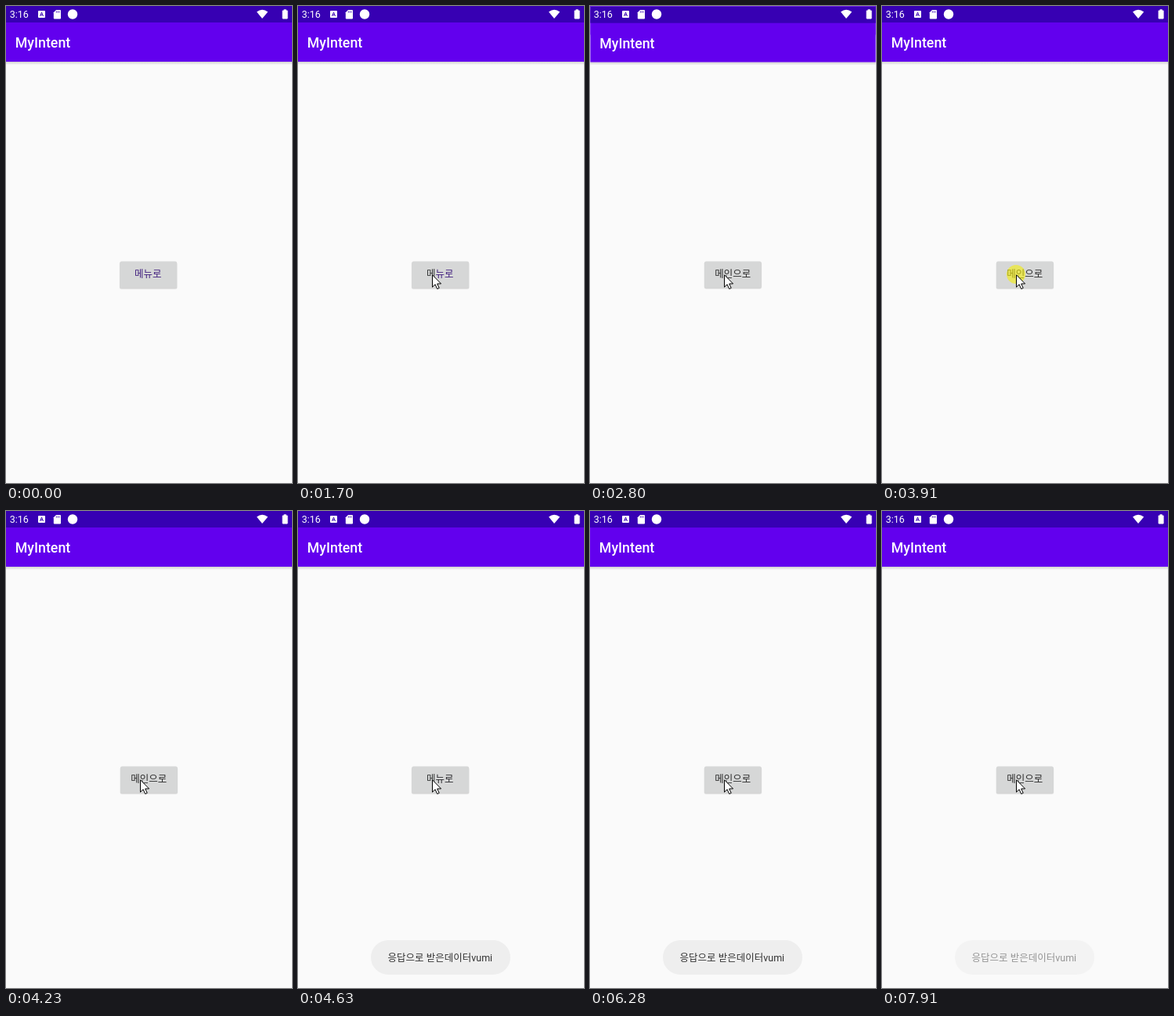
Recreate the animation shown at these times as an HTML page. Size 365x608 px, loop 7990 ms.

```html
<!DOCTYPE html>
<html lang="ko">
<head>
<meta charset="utf-8">
<title>MyIntent</title>
<style>
  html, body { margin: 0; width: 100%; height: 100%; overflow: hidden; background: #fafafa; }
  svg { display: block; width: 100%; height: 100%; }
  text { font-family: Roboto, "Noto Sans CJK KR", "Noto Sans CJK", sans-serif; font-size: 12.5px; white-space: pre; }
  .title { font-size: 17.8px; font-weight: 500; fill: #fff; }
</style>
</head>
<body>
<svg viewBox="0 0 365 608">
  <defs>
    <linearGradient id="shade" x2="0" y2="1">
      <stop offset="0" stop-color="#000" stop-opacity=".17"/>
      <stop offset="1" stop-color="#000" stop-opacity="0"/>
    </linearGradient>
    <g id="frame">
      <rect width="365" height="608" fill="#fafafa"/>
      <rect y="71" width="365" height="4" fill="url(#shade)"/>
      <rect width="365" height="71" fill="#6200ee"/>
      <rect width="365" height="21" fill="#3700b3"/>
      <text class="title" x="11.8" y="53.3">MyIntent</text>
    </g>
    <g id="lift" fill="#000">
      <rect x="-.7" y=".6" width="74" height="35" rx="2.5" opacity=".05"/>
      <rect x="-.3" y=".6" width="73.2" height="34.2" rx="2.2" opacity=".1"/>
    </g>
  </defs>

  <g id="main">
    <use href="#frame"/>
    <use href="#lift" x="145.4" y="325.6"/>
    <rect id="mainBtn" x="145.4" y="325.6" width="72.6" height="33.4" rx="1.8"/>
    <text x="164" y="346.4"><tspan id="head">메</tspan><tspan id="tail">뉴로</tspan></text>
  </g>

  <g id="menu">
    <use href="#frame"/>
    <use href="#lift" x="146.1" y="325.6"/>
    <rect id="menuBtn" x="146.1" y="325.6" width="72.6" height="33.4" rx="1.8"/>
    <text x="159.3" y="346.4" fill="#2b2b2b">메인으로</text>
  </g>

  <g id="status" fill="#fff">
    <text x="4.7" y="15.3">3:16</text>
    <rect x="41" y="6" width="9" height="9" rx="1"/>
    <path d="M43.5 12.9 45.5 8l2 4.9M44.2 11.4h2.6" fill="none" stroke="#3700b3" stroke-width="1"/>
    <path d="M64 5h5a1 1 0 0 1 1 1v9.4a1 1 0 0 1-1 1h-7.2a1 1 0 0 1-1-1V8.2z"/>
    <path d="M64.3 6.4v2.2M66.2 6.4v2.2M68.1 6.4v2.2" stroke="#3700b3" stroke-width=".8"/>
    <circle cx="85" cy="10.5" r="6.2"/>
    <path d="M327 16 320 7.4Q327 2.200 334.200 7.4z"/>
    <path d="M354.600 5.400V4.200h3V5.400h1.200a.8.8 0 0 1 .8.8v9.400a.8.8 0 0 1-.8.8h-5.400a.8.8 0 0 1-.8-.8V6.200a.8.8 0 0 1 .8-.8z"/>
  </g>

  <g id="toast">
    <rect x="93" y="547" width="178" height="44" rx="22" fill="#eee"/>
    <text x="114.600" y="573.800" fill="#333">응답으로 받은데이터vumi</text>
  </g>

  <circle id="tap" cx="171" cy="342" r="12" fill="#f4ee10" opacity=".62"/>
  <path id="arrow" d="M.5.800V16.300L4.100 12.900 6.700 18.600 9.200 17.500 6.700 12H11.600z" fill="#fff" stroke="#000" stroke-width="1"/>
</svg>

<script>
const LOOP = 7990;
const $ = id => document.getElementById(id);
const [main, menu, mainBtn, menuBtn, head, tail, toast, tap, arrow] =
  ["main", "menu", "mainBtn", "menuBtn", "head", "tail", "toast", "tap", "arrow"].map($);

const runs = [
  [0, 1, 0], [830, 11, 79], [1700, 1, 0], [2010, 2, 100], [2320, 1, 0], [2480, 6, 80],
  [3910, 3, 80], [4230, 6, 80], [5640, 3, 80], [5960, 5, 80], [7750, 3, 80]
];
const ticks = runs.flatMap(([at, n, gap]) => Array.from({ length: n }, (_, i) => at + i * gap));

const clamp = v => Math.max(0, Math.min(1, v));
const ramp = (t, a, b) => clamp((t - a) / (b - a));
const mix = (a, b, k) => a + (b - a) * k;
const within = (t, a, b) => t >= a && t < b;
const show = (el, on) => el.setAttribute("display", on ? "inline" : "none");
const bez = (u, a, b, c, d) => {
  const v = 1 - u;
  return v * v * v * a + 3 * v * v * u * b + 3 * v * u * u * c + u * u * u * d;
};

// Two joined curves: quick start, very long settle.
function settle(x) {
  if (x <= 0 || x >= 1) return clamp(x);
  const k = 1 / 6;
  const [px, py] = x < k
    ? [[0, .05, .13333, k], [0, 0, .06, .4]]
    : [[k, .20833, .25, 1], [.4, .82, 1, 1]];
  let lo = 0, hi = 1;
  for (let i = 0; i < 24; i++) {
    const mid = (lo + hi) / 2;
    if (bez(mid, ...px) < x) lo = mid; else hi = mid;
  }
  return bez(lo, ...py);
}

function place(el, scale, alpha) {
  el.setAttribute("transform", `translate(182.5 304) scale(${scale}) translate(-182.5 -304)`);
  el.setAttribute("opacity", alpha);
  show(el, alpha > 0);
}

const SPAN = 400, OPEN = [2530, 5930], CLOSE = 4280;

function screens(t) {
  const back = t >= CLOSE && t < OPEN[1];
  const start = back ? CLOSE : t < CLOSE ? OPEN[0] : OPEN[1];
  const age = t - start, k = settle(age / SPAN);
  if (back) {
    place(main, mix(1.1, 1, k), 1);
    place(menu, mix(1, .9, k), 1 - ramp(age, 33, 83));
  } else {
    place(main, mix(1, 1.15, k), age < SPAN ? 1 : 0);
    place(menu, mix(.85, 1, k), ramp(age, 50, 100));
  }
}

function pointer(t) {
  show(arrow, t >= 830);
  const p = ramp(t, 830, 1620), u = p * (2 - p);
  const x = t >= 1700 ? 171 : Math.round(bez(u, 288, 150, 95, 170));
  const y = Math.round(bez(u, 93, 160, 290, 342));
  arrow.setAttribute("transform", `translate(${x} ${y})`);
  show(tap, within(t, 2010, 2110) || within(t, 3910, 3990) || within(t, 5640, 5720));
}

function draw(now) {
  const clock = now % LOOP;
  const t = ticks.filter(v => v <= clock).pop();
  screens(t);
  pointer(t);
  const tone = down => down ? "#c6c8c8" : "#d6d7d7";
  mainBtn.setAttribute("fill", tone(within(t, 2320, 2480) || within(t, 5800, 6400)));
  menuBtn.setAttribute("fill", tone(within(t, 4070, 4230)));
  head.setAttribute("fill", t < 1540 ? "#43217f" : "#2f3131");
  tail.setAttribute("fill", t < 2320 ? "#43217f" : "#2b2b2f");
  const fade = ramp(t, 4390, 4630) * (1 - ramp(t, 7670, 8150));
  toast.setAttribute("opacity", fade);
}

const begin = performance.now();
function loop() {
  draw(performance.now() - begin);
  requestAnimationFrame(loop);
}
loop();
</script>
</body>
</html>
```
